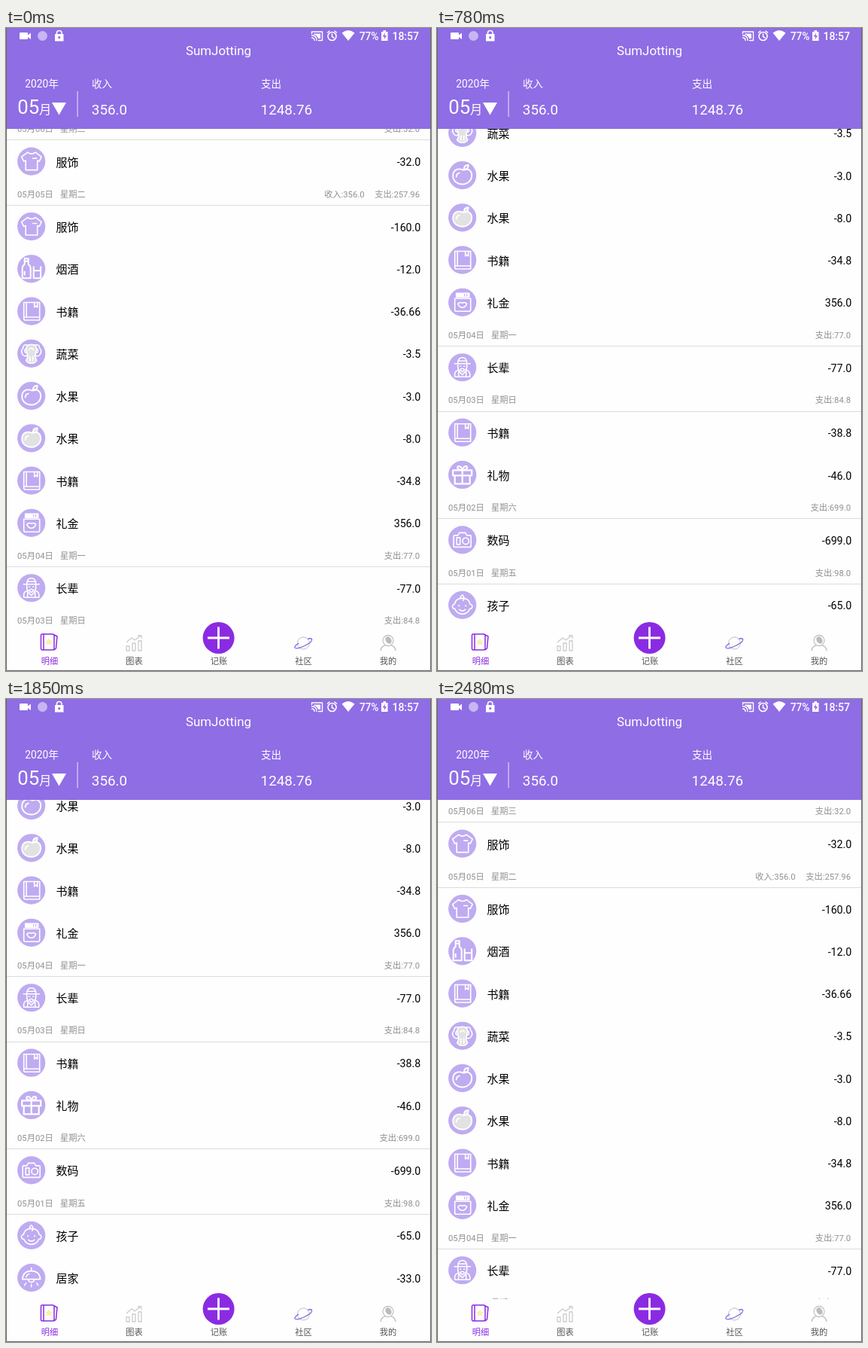
These frames come from a looping animation (565 px wide and 854 px high, 3450 ms). An HTML page:

```html
<!DOCTYPE html>
<html lang="zh-CN">
<head>
<meta charset="utf-8">
<title>SumJotting</title>
<style>
  html, body { margin: 0; width: 100%; height: 100%; overflow: hidden; background: #fefefe; }
  svg { display: block; }
  text { font-family: Roboto, "Noto Sans CJK SC", "Noto Sans CJK", sans-serif; white-space: pre; }
  .line { fill: none; stroke: #fff; stroke-width: 1.6; stroke-linecap: round; stroke-linejoin: round; }
  #glow { transform-origin: 0 797px; }
</style>
</head>
<body>
<svg id="stage" width="565" height="854" viewBox="0 0 565 854">
  <defs>
    <clipPath id="window"><rect y="134" width="565" height="663"/></clipPath>
    <g id="shirt">
      <path d="M-5-12-13-6-10 0-7.500-1V11.500H8V-1L10.500 0 13.500-6 5.500-12Q0-8-5-12Z"/>
      <path d="M2-4H7"/>
    </g>
    <g id="bottle" stroke-width="2">
      <path d="M-9-13.500H-4V-6Q-1-4-1 0V12.500H-12V0Q-12-4-9-6ZM-9-10H-4M-9 4V8"/>
      <path d="M3-2.500V12.500H12.500V-2.500M3 2.500H12.500"/>
    </g>
    <g id="book">
      <path d="M-10-11.500H11V12H-8Q-10 12-10 10ZM-6.500-11.500V8M-10 8H11"/>
      <path d="M4-11.500V-5L6-7 8-5V-11.500"/>
    </g>
    <g id="cabbage">
      <path d="M-4-11Q-11-13-11-7-15-3-11 2-8 5-5 2M4-11Q11-13 11-7 15-3 11 2 8 5 5 2M-8-6Q-10-2-7-1M8-6Q10-2 7-1"/>
      <path fill="#e2e2e2" d="M0-12Q-7-12-7-6-6-1-5 2-5 7-7 9-5 13 0 13 5 13 7 9 5 7 5 2 6-1 7-6 7-12 0-12Z"/>
      <path d="M-3-5Q0-9 3-5M-2 4V10M2 4V10"/>
    </g>
    <g id="apple" stroke-width="1.900">
      <path d="M1-7C-6-10-12.500-7-12.500 1-12.500 8-6 12 0 12 7 12 12.500 7 12.500 0 12.500-7 6-10 1-7Z"/>
      <path d="M2-7C2-12 4-13.500 8-13.500 8-9 6-7 2-7ZM-8 2Q-8-2-4-3"/>
    </g>
    <g id="fruit"><use href="#apple" fill="#e2e2e2"/></g>
    <g id="pouch">
      <path d="M-10-5H11V10Q11 12 9 12H-8Q-10 12-10 10Z"/>
      <path fill="#fff" d="M-8-12H9V-7H-8Z"/>
      <path stroke="#bfabf1" stroke-width="1" d="M3-11V-8M6-11V-8"/>
      <path d="M-6 2Q-3-1 0 1 3-1 6 2 4 7 0 7-4 7-6 2Z"/>
    </g>
    <g id="elder">
      <path d="M-10.500-5H10.500M-6-5Q-6-13 0-13 6-13 6-5M-6-8.500H6"/>
      <path d="M-6-4Q-7 4 0 10 7 4 6-4M-3-1.500H-2M2-1.500H3M-3 3Q0 0 3 3L0 6Z"/>
      <path d="M-6 4Q-11 5-10 12.500H10Q11 5 6 4M-5 6V12M5 6V12"/>
    </g>
    <g id="gift">
      <path stroke-width="2.200" d="M-12.500-6H12.500V1H-12.500ZM-10 1V12H10V1M0-6V12M0-6Q-8-7-6-11-2-13 0-6 2-13 6-11 8-7 0-6"/>
    </g>
    <g id="camera">
      <path d="M-10.500-6H-6L-4-9.500H4L6-6H10.500Q11.500-6 11.500-5V8.500Q11.500 9.500 10.500 9.500H-10.500Q-11.500 9.500-11.500 8.500V-5Q-11.500-6-10.500-6ZM-7.500-3H-3V6H-7.500Z"/>
      <circle cx="4.500" cy="1.500" r="4.200"/>
    </g>
    <g id="child">
      <path d="M-10.500-1Q-9-9 0-9 9-9 10.500-1 14 0 13 3 12 5.500 10 5 7 12 0 12-7 12-10 5-12 5.500-13 3-14 0-10.500-1ZM0-9Q-5-10 0-13.500 4-10 1-6"/>
      <path d="M-5 1H-4M4 1H5M-4 6Q0 9.500 4 6"/>
    </g>
    <g id="lamp">
      <path d="M0-13V-9M-12 2Q-11-9 0-9 11-9 12 2ZM-4 2Q-4 6 0 6 4 6 4 2M0 9V12M-7 7-9 10M7 7 9 10M-7-1Q-6-4-3-5"/>
    </g>
  </defs>

  <g clip-path="url(#window)">
    <g id="list"></g>
    <g id="glow"><circle cx="406" cy="1690.500" r="956" fill-opacity=".13"/></g>
  </g>

  <g id="header">
    <rect width="565" height="134" fill="#8f6de5"/>
    <g fill="#fff">
      <path d="M19 6H28Q29 6 29 7V9.500L33 6.500V15L29 12V14Q29 15 28 15H19Q18 15 18 14V7Q18 6 19 6Z"/>
      <circle cx="48.500" cy="10.500" r="6.500" fill-opacity=".5"/>
      <path fill-rule="evenodd" d="M65 8H76.500V17.500H65ZM70.700 11A1.600 1.600 0 1 0 70.800 11Z"/>
      <path d="M446.500 6.500Q455-.5 463.500 6.500L455 17ZM499 5H501.500V3H505V5H507.500V17H499Z"/>
      <path d="M61 99H80L70.500 115.500Z"/>
      <rect x="94.500" y="84" width="1.200" height="34" fill-opacity=".7"/>
    </g>
    <path fill="#8f6de5" d="M504 6.500 500.500 11.500H503L502.500 15.500 506 10H503.500Z"/>
    <g class="line">
      <path d="M67.500 8V6.500Q67.500 3.500 70.700 3.500 74 3.500 74 6.500V8"/>
      <path stroke-width="1.400" d="M406.500 7.500V5H420.500V16.500H415.500M406.500 9.800Q413 10 413 16.500M406.500 13Q410 13 410 16.500"/>
      <path fill="#fff" stroke="none" d="M409 7.500H418V14H415Q413 9 409 8.500Z"/>
      <circle cx="433.500" cy="11" r="5.500"/>
      <path d="M433.500 8V11.500L436 13M427.500 6 430 4M439.500 6 437 4"/>
    </g>
  </g>

  <g id="nav">
    <rect y="797" width="565" height="57" fill="#fefefe"/>
    <circle cx="282.600" cy="810" r="21" fill="#8a2be2"/>
    <path d="M268 810H297M282.500 795.500V824.500" stroke="#fff" stroke-width="2.800"/>
    <g fill="none" stroke-width="1.300" stroke-linejoin="round">
      <path stroke="#8a2be2" stroke-width="1.500" d="M48 805H62Q64 805 64 807V824Q64 826 62 826H48Q46.500 826 46.500 824V807Q46.500 805 48 805ZM50 805V826M64 806 68 808 66.500 824 64 826"/>
      <path fill="#ffefb0" stroke="#f8df8e" stroke-width=".6" d="M57 811.500 58 814 61 814.500 59 816.300 59.500 819 57 817.700 54.500 819 55 816.300 53 814.500 56 814Z"/>
      <path stroke="#cbcbcb" d="M160 821H164V827H160ZM168 817H172V827H168ZM176 814H180V827H176ZM160 816 167 810 171 813 179 807M175 807H180V811"/>
      <circle cx="395.500" cy="817" r="8" stroke="#d2d2d2"/>
      <path stroke="#8064e8" d="M389 817Q382 822 384.500 823.500 388 825 398 820 408 815 406.500 811.500 405 810 401 811.500"/>
      <circle cx="508" cy="813.500" r="7" stroke="#c4c4c4"/>
      <ellipse cx="508.500" cy="813" rx="3.700" ry="5" fill="#bbb" transform="rotate(-35 508.500 813)"/>
      <path stroke="#c4c4c4" stroke-width="1.600" d="M498 827Q499 821 504 820M512 820Q517 821 518 827"/>
    </g>
  </g>
  <path d="M.5 0V853.500H564.500V0" fill="none" stroke="#666"/>
</svg>

<script>
const NS = 'http://www.w3.org/2000/svg';
const byId = id => document.getElementById(id);

function add(parent, tag, attrs, content = '') {
  const el = document.createElementNS(NS, tag);
  for (const key in attrs) el.setAttribute(key, attrs[key]);
  el.textContent = content;
  parent.appendChild(el);
  return el;
}

function label(parent, content, x, y, size, fill, anchor = 'start', weight = 400) {
  add(parent, 'text', { x, y, fill, 'font-size': size, 'text-anchor': anchor, 'font-weight': weight }, content);
}

// Header and navigation captions
[
  ['SumJotting', 282.5, 36, 16.9, 'middle'],
  ['2020年', 25.3, 78.7, 13.8],
  ['收入', 114, 78.7, 13.6],
  ['支出', 339, 78.7, 13.6],
  ['05', 15.2, 114, 25.8],
  ['月', 44, 113.5, 16.4],
  ['356.0', 113.8, 114.7, 18.85],
  ['1248.76', 338.6, 114.7, 18.85],
  ['77%', 469.7, 15.7, 13.8, 'start', 500],
  ['18:57', 549, 15.7, 14, 'end', 500]
].forEach(([content, x, y, size, anchor, weight]) =>
  label(byId('header'), content, x, y, size, '#fff', anchor, weight));

['明细', '图表', '记账', '社区', '我的'].forEach((name, i) =>
  label(byId('nav'), name, 58 + i * 112.5, 845.2, 11.25, i ? '#555' : '#8a2be2', 'middle'));

// Each day: date, weekday, spent, earned, then its entries
const days = [
  ['05月06日', '星期三', '32.0', '', ['shirt 服饰 -32.0']],
  ['05月05日', '星期二', '257.96', '356.0', [
    'shirt 服饰 -160.0', 'bottle 烟酒 -12.0', 'book 书籍 -36.66', 'cabbage 蔬菜 -3.5',
    'apple 水果 -3.0', 'fruit 水果 -8.0', 'book 书籍 -34.8', 'pouch 礼金 356.0']],
  ['05月04日', '星期一', '77.0', '', ['elder 长辈 -77.0']],
  ['05月03日', '星期日', '84.8', '', ['book 书籍 -38.8', 'gift 礼物 -46.0']],
  ['05月02日', '星期六', '699.0', '', ['camera 数码 -699.0']],
  ['05月01日', '星期五', '98.0', '', ['child 孩子 -65.0', 'lamp 居家 -33.0']]
];
const HEAD = 30.2, ROW = 56.25, GREY = '#909090';
const list = byId('list');
let rowTop = 134;

for (const [date, weekday, spent, earned, entries] of days) {
  const base = rowTop + 19.3;
  label(list, date, 15, base, 11.25, GREY);
  label(list, weekday, 72, base, 11.25, GREY);
  label(list, '支出:' + spent, 550, base, 11.25, GREY, 'end');
  if (earned) label(list, '收入:' + earned, 476.5, base, 11.25, GREY, 'end');
  add(list, 'rect', { x: 0, y: Math.round(rowTop + 29.4), width: 565, height: 1, fill: '#dcdcdc' });
  rowTop += HEAD;
  for (const entry of entries) {
    const [icon, name, amount] = entry.split(' ');
    const cy = rowTop + 27.9;
    add(list, 'circle', { cx: 33.7, cy, r: 18.6, fill: '#bfabf1' });
    add(list, 'use', { href: '#' + icon, x: 33.7, y: cy, class: 'line' });
    label(list, name, 66.5, rowTop + 34.4, 15, '#000');
    label(list, amount, 551.3, rowTop + 34, 14.2, '#000', 'end');
    rowTop += ROW;
  }
}

// Time in ms, scroll offset, strength of the overscroll glow
const LOOP = 3450;
const steps = [
  [0, 15, 0], [120, 42, 0], [280, 102, 0],
  [420, 180, 0], [470, 225, 0], [530, 264, 0], [590, 287, 0],
  [630, 296, 0], [680, 302, 0], [730, 306, 0], [780, 308, 0],
  [1050, 318, 0], [1120, 338, 0], [1190, 358, 0], [1260, 362, .4],
  [1320, 362, .8], [1370, 362, 1], [1470, 362, 1], [1520, 362, .9],
  [1590, 362, .7], [1640, 362, .45], [1720, 362, .25], [1790, 362, .1], [1850, 362, 0],
  [1980, 318, 0], [2050, 238, 0], [2110, 158, 0],
  [2200, 92, 0], [2270, 50, 0], [2340, 22, 0], [2410, 6, 0], [2480, 0, 0], [LOOP, 0, 0]
];

function play(el, pose) {
  const frames = steps.map(([time, scroll, glow]) =>
    ({ offset: time / LOOP, easing: 'steps(1, end)', ...pose(scroll, glow) }));
  el.animate(frames, { duration: LOOP, iterations: Infinity });
}

play(list, scroll => ({ transform: `translateY(${-scroll}px)` }));
play(byId('glow'), (scroll, glow) => ({ transform: `scaleY(${glow})`, opacity: Math.min(1, glow * 1.2) }));
</script>
</body>
</html>
```
